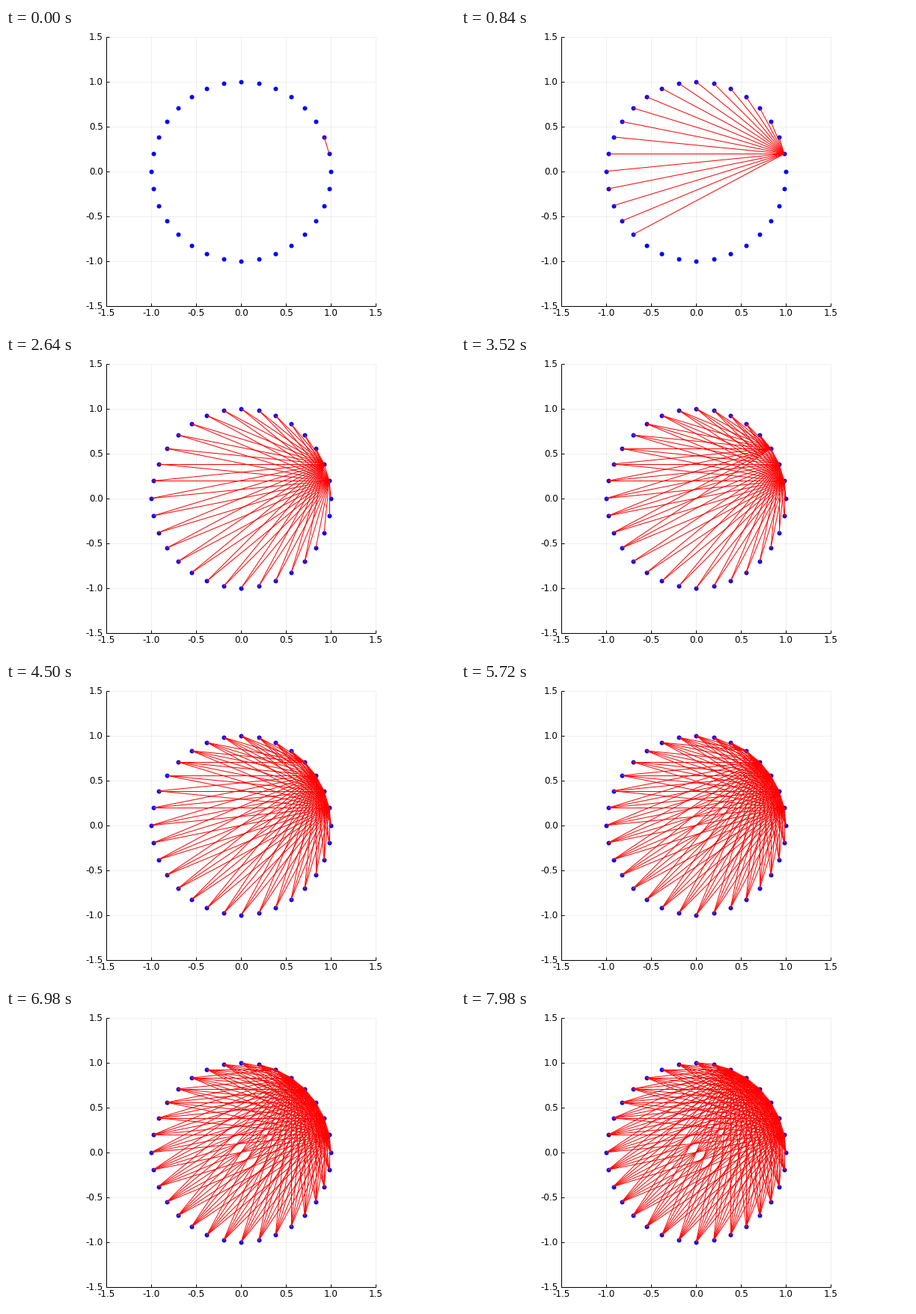
A matplotlib script for the animation above (8000 ms loop, 600 by 400 pixels).

```python
import numpy as np
import matplotlib.pyplot as plt
from itertools import combinations
from matplotlib.animation import FuncAnimation
from matplotlib.collections import LineCollection

W, H, DPI = 600, 400, 100
PX = 72 / DPI                      # one pixel in points
CX, CY, UNIT = 314.3, 191.7, 119.9
N = 32
STEP, LOOP = 20, 8000              # ms

plt.rcParams["font.family"] = "DejaVu Sans"
fig = plt.figure(figsize=(W / DPI, H / DPI), dpi=DPI, facecolor="white")
ax = fig.add_axes([0, 0, 1, 1])
ax.set_xlim(0, W)
ax.set_ylim(H, 0)
ax.axis("off")


def to_px(x, y):
    return CX + UNIT * x, CY - UNIT * y


def rule(xs, ys, **style):
    ax.plot(xs, ys, lw=PX, solid_capstyle="butt", **style)


def draw_axes():
    left, bottom = to_px(-1.5, -1.5)
    right, top = to_px(1.5, 1.5)
    for v in np.arange(-1.5, 1.6, 0.5):
        x, y = to_px(v, v)
        rule([x, x], [top, bottom], color="black", alpha=0.1 * 0.6, zorder=1)
        rule([left, right], [y, y], color="black", alpha=0.1 * 0.6, zorder=1)
        rule([x, x], [bottom, bottom - 4], color="black", zorder=2)
        rule([left, left + 4], [y, y], color="black", zorder=2)
        label = f"{v:.1f}"
        ax.text(x, 385.4, label, size=12 * PX, ha="center", va="baseline")
        ax.text(129.6, y + 4.4, label, size=12 * PX, ha="right", va="baseline")
    rule([left, left], [top, bottom], color="black", zorder=2)
    rule([left, right], [bottom, bottom], color="black", zorder=2)


draw_axes()

angle = 2 * np.pi * np.arange(1, N + 1) / N
points = np.column_stack(to_px(np.cos(angle), np.sin(angle)))
ax.plot(*points.T, "o", ms=6 * PX, mfc="blue", mec="none", mew=0, zorder=3)

chords = [points[list(pair)] for pair in combinations(range(N), 2)]
web = LineCollection([], colors="red", linewidths=PX, zorder=4)
ax.add_collection(web, autolim=False)


def chord_count(ms):
    """Chords come in threes every 140 ms: two short holds, then a long one."""
    group, rest = divmod(ms + 20, 140)
    return 3 * group + min(rest // 20, 2)


def update(i):
    web.set_segments(chords[:chord_count(i * STEP)])
    return [web]


def start():
    return update(0)


anim = FuncAnimation(fig, update, frames=LOOP // STEP, init_func=start,
                     interval=STEP, repeat=True, repeat_delay=0, blit=False)
plt.show()
```
